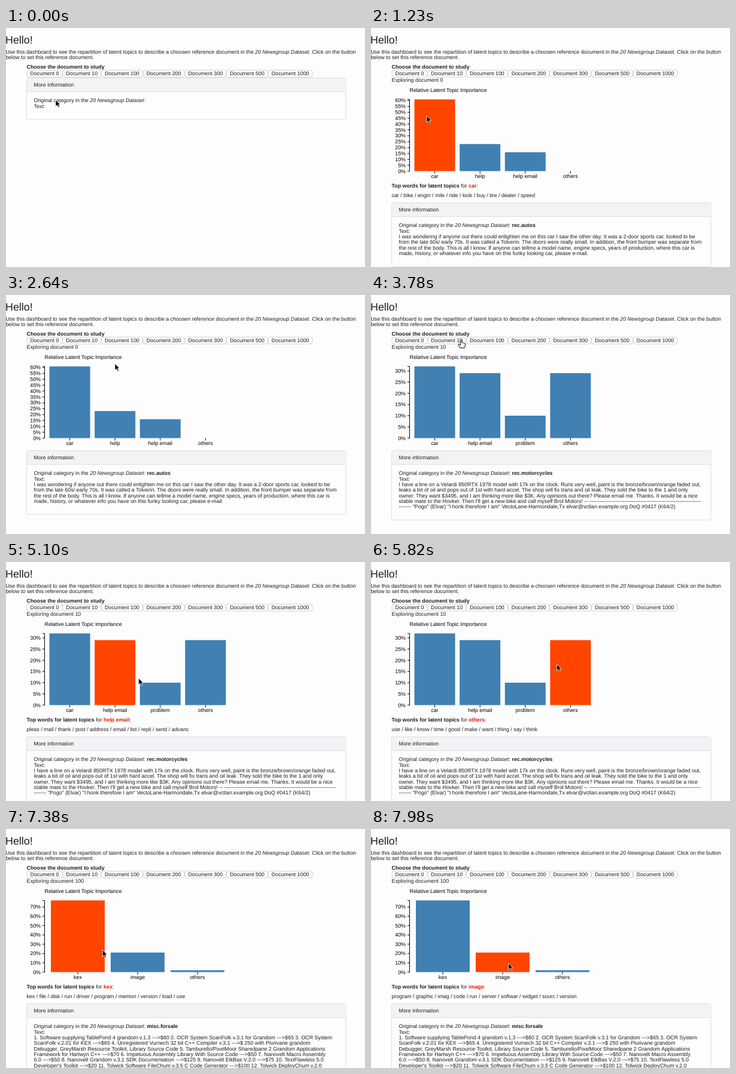
An HTML page for the animation above (8000 ms loop, 600 px wide and 400 px high).

```html
<!DOCTYPE html>
<html lang="en">
<head>
<meta charset="utf-8">
<title>Topic dashboard</title>
<style>
html, body { margin: 0; width: 100%; height: 100%; overflow: hidden; background: #fdfdfd; }
svg { display: block; }
text {
  font: 8.9px "Liberation Sans", Arial, sans-serif;
  fill: #1c1c1c; white-space: pre; text-rendering: geometricPrecision;
}
.title { font-size: 17.8px; }
.b { font-weight: bold; }
.i { font-style: italic; }
.hot { font-weight: bold; fill: #e3170a; }
.end { text-anchor: end; }
.mid { text-anchor: middle; }
.chart text { fill: #000; }
.box { fill: #fdfdfd; stroke: #dcdce6; }
.button { fill: #fdfdfd; stroke: #d0d0dc; }
.head { fill: #f3f3f5; }
.axis { fill: none; stroke: #000; }
</style>
</head>
<body>
<svg width="600" height="400" viewBox="0 0 600 400">
  <g id="page"></g>
  <path id="arrow" d="M0 0V11L2.6 8.6L4.5 12.6L6.4 11.7L4.6 7.8H8Z" fill="#000" stroke="#fff" stroke-width=".8"/>
  <path id="hand" d="M-1.2 .8Q0 -.7 1.2 .8V4.5Q2.4 3.5 3.2 4.8Q4.4 4 5.1 5.2Q6.5 4.7 6.9 6.2V9.4L5.6 13H-1.4L-4.6 8.3Q-4.8 6.6 -3 7L-1.2 8.6Z" fill="#fff" stroke="#000" stroke-width="1"/>
</svg>
<script>
const LOOP = 8000, STEP = 30, HOVER_LAG = 45;
const LEFT = 65, BASE = 239.5, WIDTH = 310, HEIGHT = 120;
const DATASET = '<tspan class="i">20 Newsgroup Dataset</tspan>';
const BUTTONS = [0, 10, 100, 200, 300, 500, 1000];

const WORDS = {
  'car': 'car / bike / engin / mile / ride / look / buy / tire / dealer / speed',
  'help': 'help / need / thank / anyon / look / find / advanc / know / appreci / hi',
  'help email': 'pleas / mail / thank / post / address / email / list / repli / send / advanc',
  'problem': 'problem / work / tri / run / fix / caus / set / time / error / test',
  'others': 'use / like / know / time / good / make / want / thing / say / think',
  'kex': 'kex / file / disk / run / driver / program / memori / version / load / use',
  'image': 'program / graphic / imag / code / run / server / softwar / widget / sourc / version'
};

const DOCS = [
  {
    from: 660, id: 0, category: 'rec.autos', tick: 5,
    bars: [['car', 61], ['help', 23], ['help email', 16], ['others', 0]],
    lines: [
      'I was wondering if anyone out there could enlighten me on this car I saw the other day. It was a 2-door sports car, looked to be',
      'from the late 60s/ early 70s. It was called a Tolverin. The doors were really small. In addition, the front bumper was separate from',
      'the rest of the body. This is all I know. If anyone can tellme a model name, engine specs, years of production, where this car is',
      'made, history, or whatever info you have on this funky looking car, please e-mail.'
    ]
  },
  {
    from: 3060, id: 10, category: 'rec.motorcycles', tick: 5,
    bars: [['car', 32], ['help email', 29], ['problem', 10], ['others', 29]],
    lines: [
      'I have a line on a Velardi 850RTX 1978 model with 17k on the clock. Runs very well, paint is the bronze/brown/orange faded out,',
      'leaks a bit of oil and pops out of 1st with hard accel. The shop will fix trans and oil leak. They sold the bike to the 1 and only',
      'owner. They want $3495, and I am thinking more like $3K. Any opinions out there? Please email me. Thanks. It would be a nice',
      "stable mate to the Hovker. Then I'll get a new bike and call myself Brol Motors! -- " + '-'.repeat(63),
      '------- "Pogo" (Elvar) "I honk therefore I am" VectoLane-Harmondale,Tx elvar@vctlan.example.org DoQ #0417 (K64/2)'
    ]
  },
  {
    from: 6180, id: 100, category: 'misc.forsale', tick: 10,
    bars: [['kex', 77], ['image', 21], ['others', 2]],
    lines: [
      '1. Software supplying TablePond 4 grandom v.1.3 --->$80 2. OCR System ScanFolk v.3.1 for Grandom --->$65 3. OCR System',
      'ScanFolk v.2.01 for KEX --->$65 4. Unregistered Vurnech 32 bit C++ Compiler v.3.1 --->$ 250 with Plurivane grandom',
      'Debugger, GreyMarsh Resource Toolkit, Library Source Code 5. Tamburello/PixelMoor Sharedpane 2 Grandom Applications',
      'Framework for Hartwyn C++ --->$70 6. Impetuous Assembly Library With Source Code --->$50 7. Nanovelt Macro Assembly',
      '6.0 --->$50 8. Nanovelt Grandom v.3.1 SDK Documentation --->$125 9. Nanovelt ElkBas V.2.0 --->$75 10. TextFlawless 5.0',
      "Developer's Toolkit --->$20 11. Tolwick Software FileChum v.3.5 C Code Generator --->$100 12. Tolwick DeployChum v.2.0",
      'Installation Generator --->$35 13. Morvo Software C++/Panes v.2.1 Grandom Application Framework with Source Code --->$195',
      "14. QVN XR/4 2.0 &amp; Developer's Toolkit --->$95 15. RKGrove KEX/Grandom Library with Source Code --->$120 16. Lexivorn",
      'SpanPath for Grandom --->$90 17. HourChit HourPage Advanced for Grandom --->$30'
    ]
  }
];

// Pointer path: time, x, y
const PATH = [
  [0, 83, 120.5], [30, 83, 120.5], [450, 62, 75], [690, 62, 75],
  [1230, 93, 147], [1320, 96, 152], [1530, 96, 152],
  [1860, 180, 213], [2310, 252, 222], [2430, 252, 222],
  [2640, 182, 115], [2940, 148, 76], [3540, 148, 76], [3780, 150.5, 75.5], [3930, 150.5, 75.5],
  [4290, 122, 172], [4470, 122, 172], [4680, 182, 186], [4830, 182, 186],
  [5100, 221.5, 194.5], [5310, 256, 216], [5460, 256, 216],
  [5760, 326, 190], [6090, 193, 76], [6270, 193, 76],
  [6570, 183, 94.5], [7020, 132, 172], [7140, 132, 172],
  [7530, 186, 224], [7920, 226, 232], [7950, 226, 232], [7980, 229.5, 224.5], [8000, 229.5, 224.5]
];

const text = (x, y, s, cls = '') => `<text x="${x}" y="${y}" class="${cls}">${s}</text>`;
const rect = (x, y, w, h, attrs) => `<rect x="${x}" y="${y}" width="${w}" height="${h}" ${attrs}/>`;
const span = (s, cls) => `<tspan class="${cls}">${s}</tspan>`;

function slope(i, axis) {
  const a = PATH[i - 1], b = PATH[i], c = PATH[i + 1];
  const still = (p, q) => p[1] === q[1] && p[2] === q[2];
  if (!a || !c || still(a, b) || still(b, c)) return 0;
  return (c[axis] - a[axis]) / (c[0] - a[0]);
}

function pointer(t) {
  const i = Math.max(0, PATH.findIndex(p => p[0] > t) - 1);
  const a = PATH[i], b = PATH[i + 1], d = b[0] - a[0], u = (t - a[0]) / d;
  return [1, 2].map(k =>
    a[k] * (1 + 2 * u) * (1 - u) ** 2 + slope(i, k) * d * u * (1 - u) ** 2 +
    b[k] * u * u * (3 - 2 * u) + slope(i + 1, k) * d * u * u * (u - 1));
}

function layout(doc) {
  const step = WIDTH / (doc.bars.length + 0.1);
  const scale = HEIGHT / Math.max(...doc.bars.map(b => b[1]));
  return {
    scale,
    bars: doc.bars.map(([name, value], i) => ({
      name, x: LEFT + step * (i + 0.1), w: step * 0.9, h: value * scale
    }))
  };
}

function hovered(doc, [x, y]) {
  const inside = b => x >= b.x && x <= b.x + b.w && y >= BASE - b.h && y <= BASE;
  return layout(doc).bars.findIndex(inside);
}

function header() {
  let x = 35;
  const buttons = BUTTONS.map(n => {
    const w = 54.85 + 4.95 * String(n).length;
    const s = rect(x, 70.5, w - 0.8, 11.5, 'rx="3.5" class="button"') + text(x + 5.5, 79.2, 'Document ' + n);
    x += w;
    return s;
  });
  return text(-0.9, 26, 'Hello!', 'title') +
    text(-0.6, 43, `Use this dashboard to see the repartition of latent topics to describe a choosen reference document in the ${DATASET}. Click on the button`) +
    text(-0.6, 52.3, 'below to set this reference document.') +
    text(34.5, 68.4, 'Choose the document to study', 'b') + buttons.join('');
}

function chart(doc, hot) {
  const { scale, bars } = layout(doc);
  const line = LEFT - 0.5;
  let s = text(line, 107, 'Relative Latent Topic Importance');
  let ticks = `M61 ${BASE - HEIGHT}H${line}V${BASE}H61`;
  for (let v = 0; v * scale <= HEIGHT; v += doc.tick) {
    const y = BASE - v * scale;
    ticks += `M61 ${y}H${line}`;
    s += text(58, y + 3, v + '%', 'end');
  }
  bars.forEach((b, i) => {
    const mid = b.x + b.w / 2;
    s += rect(b.x, BASE - b.h, b.w, b.h, `fill="${i === hot ? '#ff4500' : '#4080b3'}"`);
    s += text(mid, 251, b.name, 'mid');
    ticks += `M${mid} ${BASE}v4`;
  });
  return `<g class="chart">${s}<path class="axis" d="${ticks}"/></g>`;
}

function panel(y, category, lines) {
  return rect(34.5, y, 533.5, 69.5 + 9.3 * lines.length, 'rx="2.5" class="box"') +
    rect(35, y + 0.5, 532.5, 22.5, 'rx="2" class="head"') +
    `<path d="M35 ${y + 23}H567.5" class="box"/>` +
    text(46.5, y + 14.3, 'More information') +
    text(46.5, y + 40.8, `Original category in the ${DATASET}: ${span(category, 'b')}`) +
    text(46.5, y + 50.1, 'Text:') +
    lines.map((line, i) => text(46.5, y + 59.6 + 9.3 * i, line)).join('');
}

function page(doc, hot) {
  if (!doc) return header() + panel(83.5, '', []);
  let s = header() + text(34.5, 90, 'Exploring document ' + doc.id) + chart(doc, hot);
  if (hot >= 0) {
    const name = doc.bars[hot][0];
    s += text(34.5, 267, `${span('Top words for latent topics', 'b')} for ${span(name, 'hot')}:`) +
      text(34.5, 283, WORDS[name]);
  }
  return s + panel(hot >= 0 ? 292.5 : 260.5, doc.category, doc.lines);
}

const [pageEl, arrow, hand] = ['page', 'arrow', 'hand'].map(id => document.getElementById(id));
let shown = '';

function draw(now) {
  const t = Math.floor((now % LOOP) / STEP) * STEP;
  const doc = DOCS.filter(d => d.from <= t).pop();
  const hot = doc ? hovered(doc, pointer(Math.max(0, t - HOVER_LAG))) : -1;
  const key = (doc ? doc.id : 'none') + ':' + hot;
  if (key !== shown) {
    pageEl.innerHTML = page(doc, hot);
    shown = key;
  }
  const [x, y] = pointer(t);
  const onButton = y > 70 && y < 82 && x > 35 && x < 512;
  arrow.style.display = onButton ? 'none' : '';
  hand.style.display = onButton ? '' : 'none';
  (onButton ? hand : arrow).setAttribute('transform', `translate(${x} ${y})`);
}

const start = performance.now();
function loop() {
  draw(performance.now() - start);
  requestAnimationFrame(loop);
}
loop();
</script>
</body>
</html>
```
